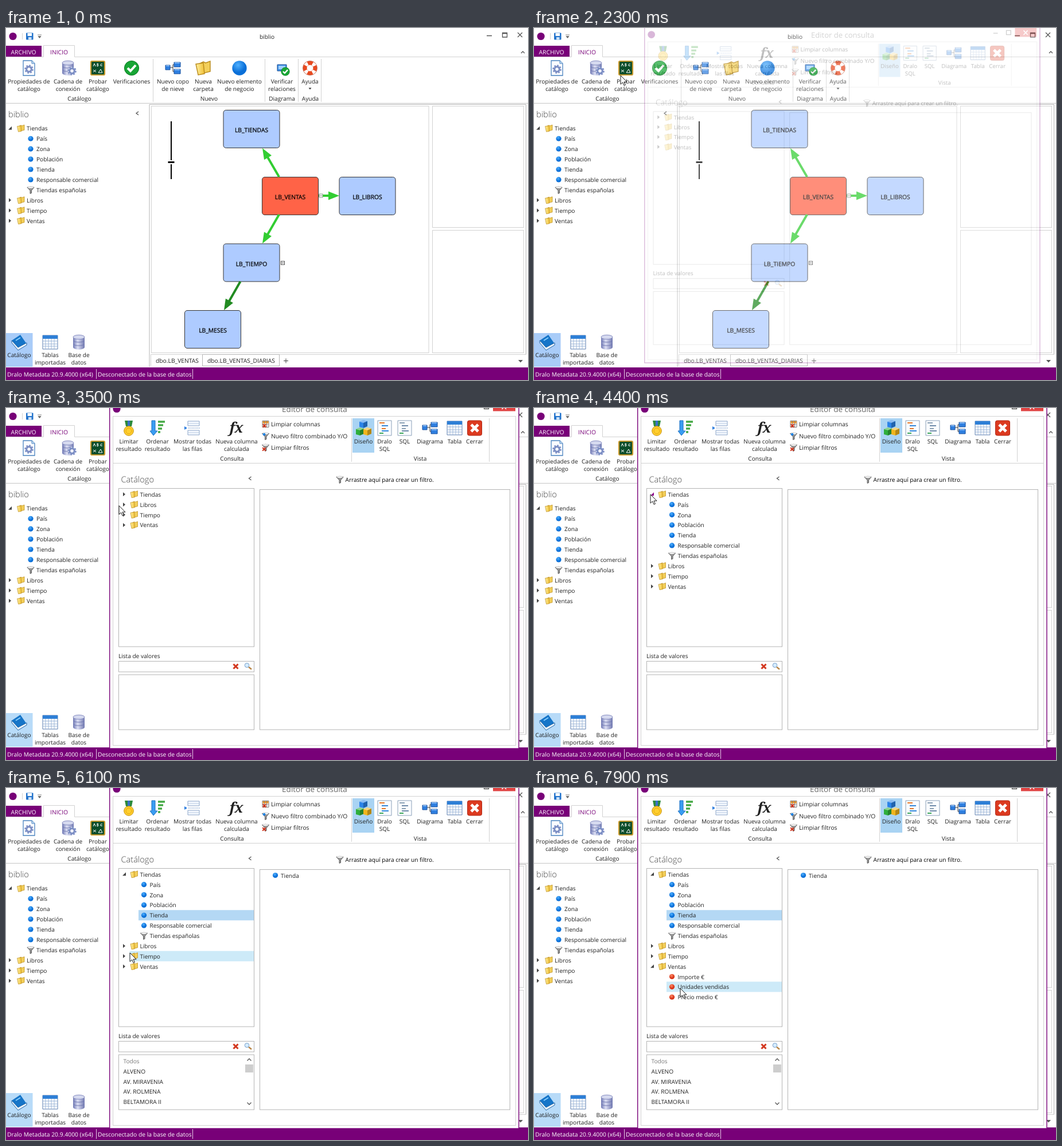
An HTML page for the animation above (8 s loop, 910 by 615 pixels).

```html
<!DOCTYPE html>
<html lang="es">
<head>
<meta charset="utf-8">
<title>biblio</title>
<style>
html, body { margin: 0; width: 100%; height: 100%; overflow: hidden; background: #fff; }
svg { display: block; width: 910px; height: 615px; }
text { font: 10.1px "Open Sans", "Noto Sans", sans-serif; fill: #222; text-rendering: geometricPrecision; white-space: pre; }
.mid { text-anchor: middle; }
.white { fill: #fff; }
.head { font-size: 14.6px; font-weight: 300; fill: #444; }
.title { font-size: 13.5px; fill: #666; text-anchor: middle; }
.node { font-size: 10.3px; fill: #000; stroke: #000; stroke-width: .25; text-anchor: middle; }
.code { font-size: 10.3px; }
.fx { font: italic bold 25px "Noto Serif", serif; text-anchor: middle; letter-spacing: -1px; }
.box { fill: none; stroke: #b4b4b4; }
.pale { fill: none; stroke: #d2d2d2; }
.thin { fill: none; stroke: #555; stroke-width: 1.3; }
</style>
</head>
<body>
<svg viewBox="0 0 910 615">
<defs>
  <radialGradient id="blue" cx=".4" cy=".3"><stop stop-color="#4fb0ff"/><stop offset="1" stop-color="#0a6fd8"/></radialGradient>
  <radialGradient id="red" cx=".4" cy=".3"><stop stop-color="#ff8a66"/><stop offset="1" stop-color="#d8361a"/></radialGradient>
  <linearGradient id="gold"><stop stop-color="#fff0a0"/><stop offset="1" stop-color="#f0bf35"/></linearGradient>
  <linearGradient id="metal"><stop stop-color="#6f78b4"/><stop offset=".4" stop-color="#dde0f4"/><stop offset="1" stop-color="#7078b0"/></linearGradient>
  <g id="ball"><circle r="4.6" fill="url(#blue)"/></g>
  <g id="measure"><circle r="4.6" fill="url(#red)"/></g>
  <g id="folder" stroke="#b98a1c" stroke-width=".7">
    <path d="M-3-4L0-5.5L2-4.5L6-6V3L-2 5Z" fill="#f3cf5a"/><path d="M-6.5-3.5L0-4.5L1 5L-4.5 6Z" fill="url(#gold)"/>
  </g>
  <g id="funnel"><path d="M-6-4.5Q0-7 6-4.5L1.5 1V5.5L-1 6.5V1Z" fill="#999" stroke="#444" stroke-width=".8"/><ellipse cy="-4.4" rx="5" ry="1.3" fill="#fff"/></g>
  <g id="gear" fill="none" stroke="#7d8fc4"><circle r="4.2" stroke-width="3.4"/><circle r="6.6" stroke-width="2.4" stroke-dasharray="2.8 2.38"/><circle r="2.2" stroke="#fff"/></g>
  <g id="page"><path d="M-10-13H5L10-8V13H-10Z" fill="#fafcff" stroke="#4a83bf" stroke-width="1.3"/><path d="M5-13V-8H10" fill="#c6def4" stroke="#4a83bf"/><use href="#gear" y="2"/></g>
  <g id="db"><path d="M-10-9V9C-8 14 8 14 10 9V-9Z" fill="url(#metal)"/><ellipse cy="-9" rx="10" ry="3.7" fill="#d5d9ef" stroke="#858cc0"/><path d="M-10-3C-8 1 8 1 10-3M-10 3C-8 7 8 7 10 3" fill="none" stroke="#7179b2"/></g>
  <g id="link"><use href="#db"/><circle cx="7" cy="5" r="7" fill="#eef"/><use href="#gear" x="7" y="5"/></g>
  <g id="board"><rect x="-12" y="-12" width="24" height="24" rx="2" fill="#0c4d2a" stroke="#c99a2e" stroke-width="2.2"/><path d="M-8-3L-6-8L-4-3M-1-8V-3Q3-4 0-6Q2-8-1-8M8-7Q4-8 5-4H8M-8 3L-3 7M-8 7L-3 3M1 8L5 2L8 8Z" fill="none" stroke="#fff"/></g>
  <g id="check"><circle r="12.6" fill="#18a535" stroke="#087a20"/><path d="M-7 0L-2 5L7-5" fill="none" stroke="#fff" stroke-width="4"/></g>
  <g id="graph"><path d="M-5-1H0V-6H3M0-1V6H3" fill="none" stroke="#333"/><g fill="#2f7fe0" stroke="#164e9c"><path d="M-13-5H-5V3H-13Z"/><path d="M2-10H13V-2H2ZM2 2H13V10H2Z"/></g><path d="M-12-4H-6M3-9H12M3 3H12" stroke="#9cccff" stroke-width="1.5"/></g>
  <g id="verify"><path d="M-8-6H8V5H-8Z" fill="#3d8ee6" stroke="#1c4f92"/><path d="M-6-4H6V2H-6Z" fill="#9fd0ff"/><use href="#check" transform="translate(6 6) scale(.58)"/></g>
  <g id="buoy" fill="none"><circle r="9" stroke="#e8491f" stroke-width="7"/><circle r="9" stroke="#fff" stroke-width="6.6" stroke-dasharray="5.5 8.64" stroke-dashoffset="-4.3"/><circle r="12.6" stroke="#b96a55" stroke-width=".7"/></g>
  <g id="book"><path d="M-13-3L2-13L13 3L-2 12Z" fill="#1675c8"/><path d="M-13-3L-2 9L13 1V5L-2 14L-13 1Z" fill="#e8f1f8" stroke="#15599c" stroke-width=".9"/><path d="M-6-3L2-8" stroke="#8bd0ff" stroke-width="2"/></g>
  <g id="table"><path d="M-13-12H13V12H-13Z" fill="#fff" stroke="#5c7fb0"/><path d="M-13-12H13V-6H-13Z" fill="#2e7fd6"/><path d="M-8-6V12M-3-6V12M2-6V12M7-6V12M-13-2H13M-13 3H13M-13 7H13" stroke="#9db6d8"/></g>
  <g id="medal"><path d="M-7-13H-2V-3H-5ZM2-13H7L5-3H2Z" fill="#2d8a3c"/><path d="M-2-13H2V-3H-2Z" fill="#3b70c9"/><circle cy="5" r="8.3" fill="#ffcf2e" stroke="#c68d0a"/><circle cy="5" r="5" fill="none" stroke="#e5a512"/></g>
  <g id="sort"><path d="M-10-13H-4V5H0L-7 13L-13 5H-10Z" fill="#3a9df2" stroke="#1b6fc0"/><path d="M1-11H13M1-5H10M1 1H8M1 7H5" stroke="#45a945" stroke-width="3.6"/></g>
  <g id="rows"><path d="M-8-12H12V-4H-8ZM-8 4H12V12H-8Z" fill="#f5f9ff" stroke="#8ba4c8"/><path d="M-8-8H12M-8 8H12" stroke="#b6c7df"/><path d="M-7 0H13" stroke="#5a86c0" stroke-dasharray="2 1.5"/><path d="M-14-3L-9 0L-14 3Z" fill="#2f7fe0"/></g>
  <g id="cube"><path d="M-7-4L0-7L7-5V4L0 7L-7 5Z"/><path d="M-7-4L0-7L7-5L0-2Z" fill="#fff" opacity=".45"/><path d="M0-2L7-5V4L0 7Z" opacity=".25" fill="#000"/></g>
  <g id="cubes"><use href="#cube" y="-7" fill="#2b83e8"/><use href="#cube" x="-6" y="6" fill="#2fae3b"/><use href="#cube" x="7" y="6" fill="#f1b51d"/></g>
  <g id="list"><path d="M-12-13H12V13H-12Z" fill="#fafcff" stroke="#8ba0b8"/><g fill="none" stroke-width="2"><path d="M-9-9H0M-5 1H2" stroke="var(--a)"/><path d="M-5-4H6M-5 5H7" stroke="var(--b)"/><path d="M-9 9H-2" stroke="var(--c)"/></g></g>
  <g id="close"><rect x="-12.5" y="-13" width="25" height="26" rx="3" fill="#dc3a20" stroke="#b12814"/><path d="M-6-6L6 6M6-6L-6 6" stroke="#fff" stroke-width="5"/></g>
  <g id="cross"><path d="M-4-4L4 4M4-4L-4 4" stroke="#d2361e" stroke-width="3"/></g>
  <g id="lens"><path d="M1 1L6 5" stroke="#b98545" stroke-width="2.4"/><circle cx="-2" cy="-2" r="3.8" fill="#d5ecff" stroke="#7aa0c8"/></g>
  <g id="grid"><path d="M-5.5-5.5H5.5V5.5H-5.5Z" fill="#fff" stroke="#777"/><path d="M-5-3H5" stroke="#f09a2c" stroke-width="4"/><path d="M-2-5V5M2-5V5M-5 1H5" stroke="#888"/><use href="#cross" transform="translate(-2 3) scale(.7)"/></g>
</defs>
<g id="main"></g>
<g id="dialog"><g id="frame"></g><g id="tree"></g><g id="values"></g></g>
<path id="cursor" d="M0 0V15.3L3.6 12L6.1 17.5L8.4 16.5L6 11.2H11Z" fill="#fff" stroke="#000" stroke-width=".9"/>
</svg>
<script>
const $ = id => document.getElementById(id);
const text = (x, y, s, cls = '') => `<text x="${x}" y="${y}" class="${cls}">${s}</text>`;
const label = (x, y, ...lines) => lines.map((s, i) => text(x, y + 13 * i, s, 'mid')).join('');
const rect = (x, y, x2, y2, attrs) => `<rect x="${x}" y="${y}" width="${x2 - x}" height="${y2 - y}" ${attrs}/>`;
const box = (x, y, x2, y2, cls = 'box') => rect(x, y, x2, y2, `class="${cls}"`);
const path = (d, attrs = 'class="pale"') => `<path d="${d}" ${attrs}/>`;
const icon = (id, x, y, k = 1) => `<use href="#${id}" transform="translate(${x} ${y}) scale(${k})"/>`;
const button = (id, x, y, ...lines) => icon(id, x, y) + label(x, y + 27, ...lines);
const dot = (x, y) => `<circle cx="${x}" cy="${y}" r="6.6" fill="#780078"/>`;

const items = ['País', 'Zona', 'Población', 'Tienda', 'Responsable comercial'];
const measures = ['Importe €', 'Unidades vendidas', 'Precio medio €'];
const folder = (name, open) => ({ name, open, icon: 'folder', folder: true });
const rowsOf = (shops, sales) => [
  folder('Tiendas', shops),
  ...(shops ? [...items.map(name => ({ name, icon: 'ball' })), { name: 'Tiendas españolas', icon: 'funnel' }] : []),
  folder('Libros'), folder('Tiempo'), folder('Ventas', sales),
  ...(sales ? measures.map(name => ({ name, icon: 'measure' })) : [])
];

function tree(rows, expandX, x, top, pitch, state = {}) {
  return rows.map((r, i) => {
    const y = top + pitch * i, left = r.folder ? x - 8 : x + 7.5;
    const fill = state.selected === r.name ? '#b4d8f4' : state.hover === i ? '#cdeaf8' : '';
    const arrow = r.open ? `M${expandX + 3} ${y - 3.5}V${y + 2.5}H${expandX - 3}Z` : `M${expandX - 2} ${y - 3.5}L${expandX + 2} ${y}L${expandX - 2} ${y + 3.5}Z`;
    return (fill ? rect(left, y - 9, 432, y + 9, `fill="${fill}"`) : '') +
      (r.folder ? path(arrow, `fill="${state.hot === i ? '#90108c' : '#444'}"`) : '') +
      icon(r.icon, r.folder ? x : x + 17, y) +
      text(x + (r.folder ? 10 : 27), y + 4, r.name);
  }).join('');
}

function arrow(x1, y1, x2, y2, color) {
  const a = Math.atan2(y2 - y1, x2 - x1) * 180 / Math.PI, n = Math.hypot(x2 - x1, y2 - y1);
  return `<g transform="translate(${x2} ${y2}) rotate(${a})" fill="${color}">${rect(-n, -2, -15, 2, '')}<path d="M0 0L-19 7.5V-7.5Z"/></g>`;
}

const node = (x, y, name, fill = '#aecbff') =>
  rect(x, y, x + 98, y + 66, `rx="4.5" fill="${fill}" stroke="#333"`) + text(x + 49, y + 38.5, 'LB_' + name, 'node');
const knob = (x, y, color) => rect(x - 3, y - 3, x + 3, y + 3, `fill="#fff" stroke="${color}"`) + path(`M${x - 2} ${y}H${x + 2}`, `stroke="${color}"`);

$('main').innerHTML =
  dot(12, 14.5) + path('M28.5 9V20') +
  rect(35, 8.5, 47.5, 20.5, 'rx="1" fill="#2474cc"') + rect(37.5, 9, 45, 14, 'fill="#fff"') + rect(39, 16, 44.5, 20.5, 'fill="#cfe3f7"') +
  path('M55 12H62M56 14.5H61L58.5 17.5Z', 'fill="#666" stroke="#666" stroke-width=".8"') +
  text(455, 19, 'biblio', 'mid') +
  path('M838 13.5H847M865.5 8.5H873.5V16H865.5ZM865 9.5H874M892 8L900 16M900 8L892 16', 'class="thin"') +
  rect(0, 31, 62, 50, 'fill="#780078"') + text(30.5, 46, 'ARCHIVO', 'mid white code') +
  path('M0 50.5H65.5V30.5H119.5V50.5H910') + '<g style="--ink:#780078">' + `<text x="92.5" y="46" class="mid code" style="fill:#780078">INICIO</text></g>` +
  path('M898 44L901 41L904 44', 'class="thin"') +
  '<g id="press"></g>' +
  button('page', 40, 70, 'Propiedades de', 'catálogo') + button('link', 108, 70, 'Cadena de', 'conexión') +
  button('board', 160, 70, 'Probar', 'catálogo') + button('check', 219, 70, 'Verificaciones') +
  button('graph', 291, 70, 'Nuevo copo', 'de nieve') + icon('folder', 344, 70, 2) + label(344, 97, 'Nueva', 'carpeta') +
  icon('ball', 407, 70, 2.75) + label(407, 97, 'Nuevo elemento', 'de negocio') +
  button('verify', 481, 70, 'Verificar', 'relaciones') + button('buoy', 530, 70, 'Ayuda') +
  path('M527.5 104.5H532.5L530 107.5Z', 'fill="#333"') +
  label(128, 127, 'Catálogo') + label(354, 127, 'Nuevo') + label(481, 127, 'Diagrama') + label(530.5, 127, 'Ayuda') +
  path('M256.5 54V129M451.5 54V129M509.5 54V129M549.5 54V129') + path('M0 131.5H910', 'stroke="#c6c6c6"') +
  text(4, 155.5, 'biblio', 'head') + path('M231 146L227 149L231 152', 'class="thin"') +
  tree(rowsOf(true, false), 7, 26, 175.3, 17.93) +
  '<rect id="tab" y="533" width="46.5" height="59"/>' +
  icon('book', 23, 549) + label(23, 575, 'Catálogo') + icon('table', 77, 549) + label(77, 575, 'Tablas', 'importadas') +
  icon('db', 127, 549) + label(127, 575, 'Base de', 'datos') +
  path('M906.5 570.5V133.5H250V592', 'class="box"') +
  box(253.5, 136.5, 737, 567.5, 'pale') + box(743.5, 136.5, 902.5, 348.5, 'pale') + box(743.5, 353.5, 902.5, 567.5, 'pale') +
  path('M252.5 590V570.5H906.5') + box(342.5, 570.5, 476.5, 590.5) +
  text(261, 585, 'dbo.LB_VENTAS', 'code') + text(351, 585, 'dbo.LB_VENTAS_DIARIAS', 'code') +
  path('M484 581.5H492M488 577.5V585.5', 'stroke="#444"') + path('M893 580H901L897 584.5Z', 'fill="#555"') +
  path('M288 163V264', 'stroke="#000" stroke-width="2"') + rect(281, 231, 295, 238, 'fill="#fff"') + rect(282.5, 233, 293.5, 236, 'fill="#000"') +
  node(379, 143.5, 'TIENDAS') + node(446.5, 260.5, 'VENTAS', '#ff6347') + node(581, 260.5, 'LIBROS') +
  node(379, 377, 'TIEMPO') + node(311.5, 493.5, 'MESES') +
  arrow(476, 260, 447, 210, '#32cd32') + arrow(476, 326, 447, 376.5, '#32cd32') +
  arrow(545, 293, 581, 293, '#32cd32') + arrow(408.5, 443, 380, 493, '#228b22') +
  knob(549, 293, '#8a9a8a') + knob(482.5, 410.5, '#555') +
  rect(0, 593, 910, 615, 'fill="#780078"') +
  text(2, 608.5, 'Dralo Metadata 20.9.4000 (x64)', 'white code') + text(160, 608.5, 'Desconectado de la base de datos', 'white code') +
  path('M157.5 596V613M325.5 596V613', 'stroke="#e4cbe4"');

$('frame').innerHTML =
  rect(180.7, -14, 894, 595, 'fill="#fff" stroke="#780078" stroke-width="1.4"') +
  box(186.5, 14.5, 888.5, 589.5, 'pale') + dot(193, 1.5) + text(538, 7, 'Editor de consulta', 'title') +
  path('M810 -1H818M833.5 -6H841.5V1.5H833.5Z', 'class="thin"') + rect(849, -12, 888, 5.5, 'fill="#e04343"') +
  path('M864.5 -6L872 2M872 -6L864.5 2', 'stroke="#fff" stroke-width="1.6"') +
  rect(604, 18, 642, 78, 'fill="#a9d3f3"') +
  button('medal', 214, 35, 'Limitar', 'resultado') + button('sort', 264, 35, 'Ordenar', 'resultado') +
  button('rows', 325, 35, 'Mostrar todas', 'las filas') + text(401, 43, 'fx', 'fx') + label(402, 62, 'Nueva columna', 'calculada') +
  icon('grid', 452.5, 28) + text(462, 32, 'Limpiar columnas', 'code') +
  icon('funnel', 452.5, 49) + icon('ball', 450, 46, .5) + text(462, 52.5, 'Nuevo filtro combinado Y/O', 'code') +
  icon('funnel', 452.5, 69) + icon('cross', 450, 72, .7) + text(462, 73, 'Limpiar filtros', 'code') +
  label(394, 92, 'Consulta') + label(722, 92, 'Vista') +
  button('cubes', 623, 35, 'Diseño') +
  '<g style="--a:#e8782a;--b:#3587d8;--c:#3ba55a">' + button('list', 660, 35, 'Dralo', 'SQL') + '</g>' +
  '<g style="--a:#8aa0b4;--b:#6f8baa;--c:#3ba55a">' + button('list', 695, 35, 'SQL') + '</g>' +
  button('graph', 739, 35, 'Diagrama') + button('table', 782, 35, 'Tabla') + button('close', 817, 35, 'Cerrar') +
  path('M602.5 18V94M842.5 18V94M187 96.5H888') +
  text(200.5, 129.5, 'Catálogo', 'head') + path('M427.5 120L423.5 123L427.5 126', 'class="thin"') +
  icon('funnel', 582, 125) + `<text x="591.5" y="129" style="fill:#000">Arrastre aquí para crear un filtro.</text>` +
  box(196.5, 140.5, 432.5, 417) + box(442.5, 142.5, 878.5, 562) +
  text(196, 437, 'Lista de valores') + box(196.5, 442.5, 432.5, 461) + icon('cross', 400.5, 451.5) + icon('lens', 422, 451.5) +
  box(196.5, 466, 432.5, 562);

const listing =
  `<text x="204.5" y="481" style="fill:#777">Todos</text>` +
  ['ALVENO', 'AV. MIRAVENIA', 'AV. ROLMENA', 'BELTAMORA II'].map((s, i) => text(204.5, 499 + 17.6 * i, s)).join('') +
  rect(417, 483, 431, 497, 'fill="#cdcdcd"') + path('M420.5 476.5L424 473L427.5 476.5M420.5 549.5L424 553L427.5 549.5', 'class="thin"');
const column = icon('ball', 469.5, 152.5) + text(479, 156.5, 'Tienda');

// Pointer waypoints: time, x, y
const route = [[400, 300, -25], [1100, 148, 83], [2000, 148, 83], [2100, 151, 83], [2700, 151, 83], [3100, 195, 172],
  [3300, 196, 173], [3400, 196, 173], [3700, 199, 166], [3900, 199, 166], [4200, 203, 151], [4400, 203, 151],
  [4900, 238, 180], [5000, 238, 180], [5300, 245, 214], [5800, 245, 215], [6100, 216, 288], [6700, 204, 308],
  [7100, 204, 308], [7600, 254, 349], [7900, 255, 350]];

function pointer(t) {
  const i = route.findIndex(p => p[0] > t);
  if (i === 0) return route[0].slice(1);
  if (i < 0) return route.at(-1).slice(1);
  const [t0, x0, y0] = route[i - 1], [t1, x1, y1] = route[i], k = (t - t0) / (t1 - t0);
  return [x0 + (x1 - x0) * k, y0 + (y1 - y0) * k];
}

function draw(t) {
  const [x, y] = pointer(t), over = t < 1500 && x > 137 && x < 183 && y > 53 && y < 113;
  $('cursor').setAttribute('transform', `translate(${x} ${y})`);
  $('press').innerHTML = over ? rect(137, 53, 183, 113, `fill="${t < 1400 ? '#cdeaf8' : '#b4d8f4'}"`) : '';
  $('tab').setAttribute('fill', t < 2500 ? '#a9ccf8' : '#b8dbf8');

  const shown = t < 2300 ? 0 : Math.min(1, (t - 2230) / 250);
  $('dialog').setAttribute('opacity', shown);
  $('dialog').setAttribute('transform', `translate(537.5 300) scale(${.953 + .047 * shown}) translate(-537.5 -300)`);

  const top = 150.8, pitch = 17.87, rows = rowsOf(t >= 4400, t >= 6800);
  const i = shown === 1 ? Math.floor((y - top) / pitch + .5) : -1, row = rows[i];
  $('tree').innerHTML = tree(rows, 206, 223.5, top, pitch, {
    selected: t >= 5500 ? 'Tienda' : '',
    hover: row && x >= (row.folder ? 215 : 231) ? i : -1,
    hot: row && x > 200 && x < 212 ? i : -1
  });
  $('values').innerHTML = (t >= 5500 ? listing : '') + (t >= 5700 ? column : '');
}

let last = -1;
function tick() {
  const t = Math.floor(performance.now() % 8000 / 100) * 100;
  if (t !== last) draw(last = t);
  requestAnimationFrame(tick);
}
tick();
</script>
</body>
</html>
```
